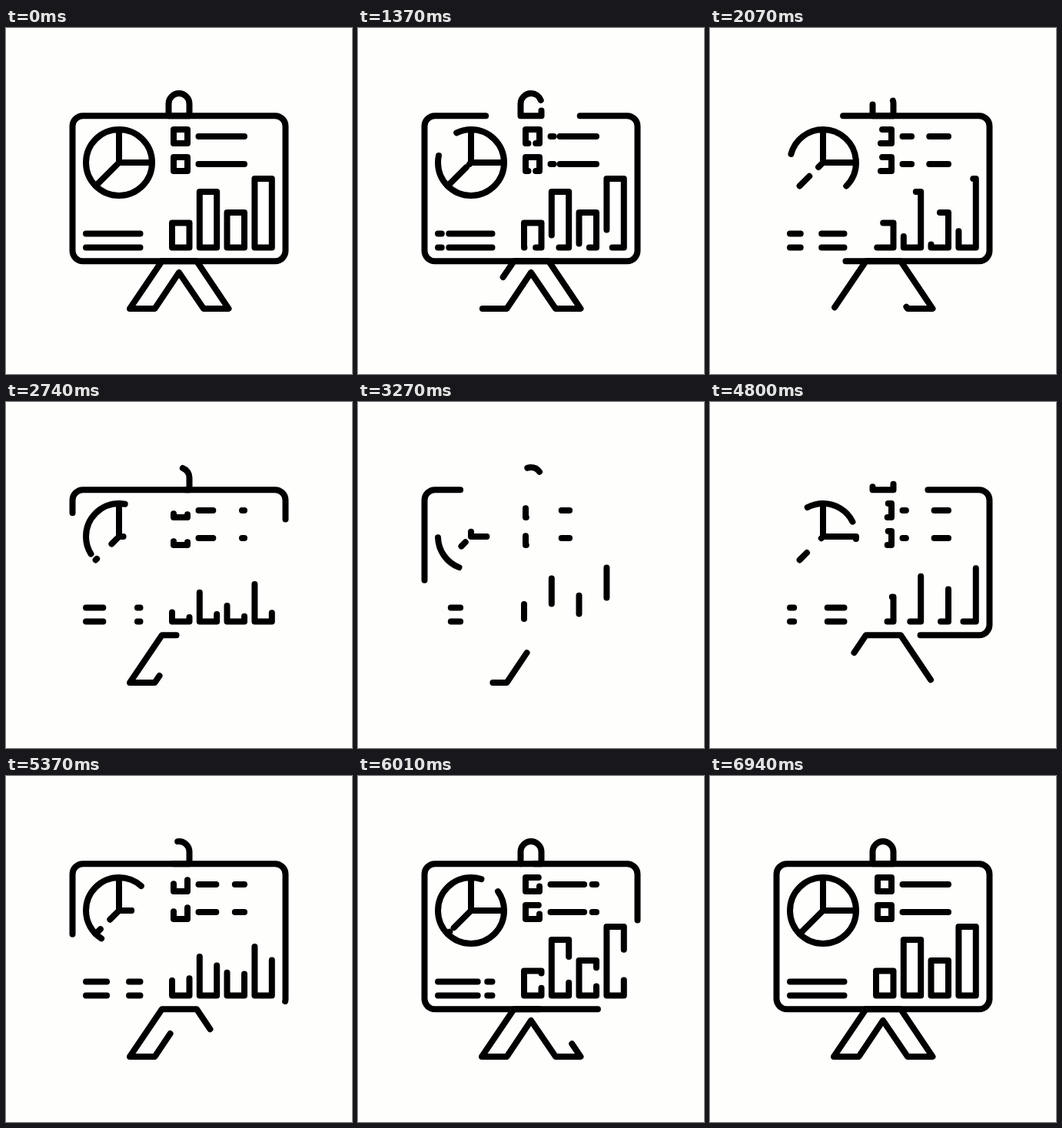
Animation of 450x450 px, one loop 7 s. Source, as an HTML page:

```html
<!DOCTYPE html>
<html lang="en">
<head>
<meta charset="utf-8">
<title>Presentation board</title>
<style>
  html, body { margin: 0; width: 100%; height: 100%; overflow: hidden; background: #fefefd; }
  svg { display: block; width: 100%; height: 100%; }
  path {
    fill: none;
    stroke: #000;
    stroke-width: 8;
    stroke-linecap: round;
    stroke-linejoin: round;
    stroke-dasharray: 100 0;
    animation: trim 7s linear infinite;
  }
  /* Hold, erase while turning back half a lap, redraw, hold. */
  @keyframes trim {
    0%, 14.2857% { stroke-dasharray: 100 0; stroke-dashoffset: 0; }
    53.5714% { stroke-dasharray: 0 100; stroke-dashoffset: 50; }
    92.8571%, 100% { stroke-dasharray: 100 0; stroke-dashoffset: 200; }
  }
</style>
</head>
<body>
<svg viewBox="0 0 450 450" aria-label="Presentation board with charts">
  <!-- board, hook, legs -->
  <path pathLength="100" d="M350 114.2a13.5 13.5 0 0 1 13.5 13.5V289.8a13.5 13.5 0 0 1-13.5 13.5H100a13.5 13.5 0 0 1-13.5-13.5V127.7a13.5 13.5 0 0 1 13.5-13.5Z"/>
  <path pathLength="100" d="M238.5 114.2H211.5V98.5a13.5 13.5 0 0 1 27 0Z"/>
  <path pathLength="100" d="M202.8 303.3H248L289.5 365H257L225 318L193.5 365H161Z"/>
  <!-- pie -->
  <path pathLength="100" d="M147 132A43 43 0 0 1 190 175H147Z"/>
  <path pathLength="100" d="M147 132V175H190A43 43 0 1 1 147 132Z"/>
  <path pathLength="100" d="M116.6 205.4L147 175"/>
  <!-- legend -->
  <path pathLength="100" d="M236 150V132H218V150Z"/>
  <path pathLength="100" d="M236 186V168H218V186Z"/>
  <path pathLength="100" d="M310 141H250.5"/>
  <path pathLength="100" d="M310 177H250.5"/>
  <!-- caption lines -->
  <path pathLength="100" d="M174.5 267.5H104"/>
  <path pathLength="100" d="M174.5 285.5H104"/>
  <!-- bars -->
  <path pathLength="100" d="M238.5 285.5V253.5H216V285.5Z"/>
  <path pathLength="100" d="M274.2 285.5V213H251.8V285.5Z"/>
  <path pathLength="100" d="M310 285.5V240H287.5V285.5Z"/>
  <path pathLength="100" d="M345.8 285.5V196H323.4V285.5Z"/>
</svg>
</body>
</html>
```
